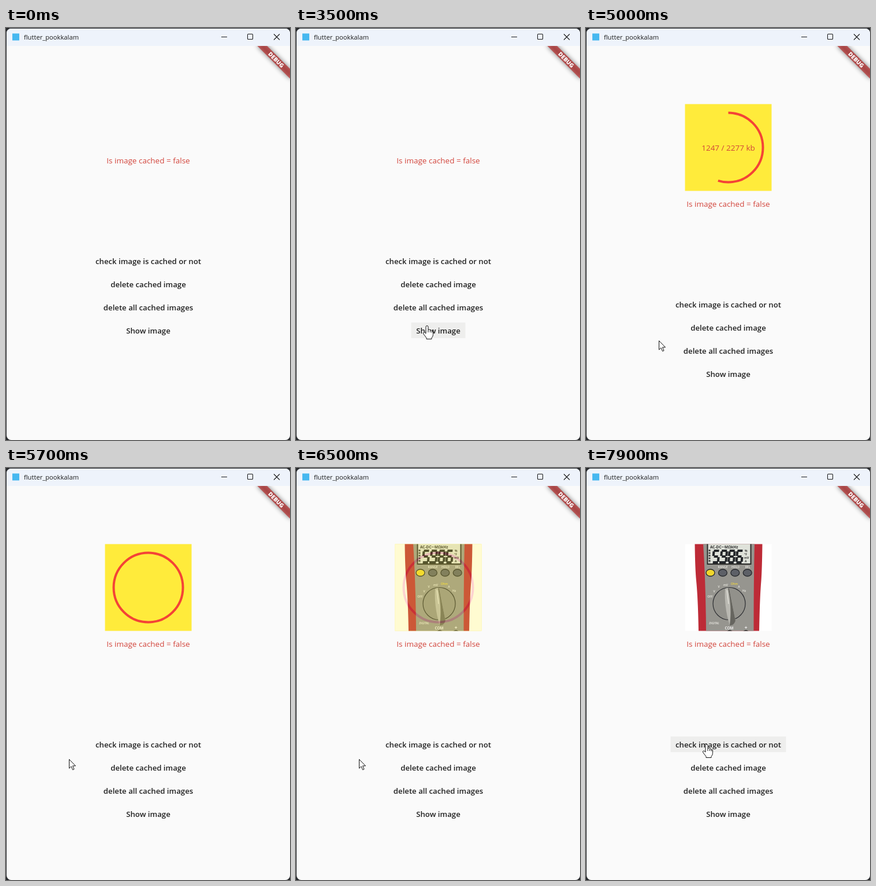
An HTML page for the animation above (8000 ms loop, 492 by 712 pixels).

```html
<!DOCTYPE html>
<html lang="en">
<head>
<meta charset="utf-8">
<title>Image cache demo</title>
<style>
  html, body { margin: 0; width: 100%; height: 100%; overflow: hidden; background: #26282b; }
  svg { display: block; width: 492px; height: 712px; }
  text { font-family: "Open Sans", "Noto Sans", sans-serif; }
  .mid { text-anchor: middle; }
  .title { font-size: 11.2px; fill: #1b1b1b; }
  .red { font-size: 13.5px; fill: #d2443b; }
  .label { font-size: 13.2px; font-weight: 600; fill: #212121; }
  .tiny { font-size: 5px; font-weight: 600; fill: #f0efe8; }
  .unit { font-size: 5px; font-weight: 700; fill: #333; }
</style>
</head>
<body>
<svg viewBox="0 0 492 712">
  <defs>
    <clipPath id="win"><rect x="1" y="1" width="491" height="711" rx="8"/></clipPath>
    <clipPath id="page"><rect x="1" y="31" width="491" height="681"/></clipPath>
    <clipPath id="photoBox"><rect x="171.5" y="131.5" width="150" height="150"/></clipPath>
    <filter id="blur" x="-30%" y="-150%" width="160%" height="400%"><feGaussianBlur stdDeviation="4"/></filter>
  </defs>

  <rect width="492" height="712" fill="#26282b"/>
  <g clip-path="url(#win)">
    <rect width="492" height="712" fill="#fafafa"/>
    <rect width="492" height="31" fill="#eef3fb"/>
    <rect x="11" y="9.5" width="12" height="12" fill="#47b8f0"/>
    <text class="title" x="31" y="20">flutter_pookkalam</text>
    <g fill="none" stroke="#1a1a1a" stroke-width="1.1">
      <path d="M373 15.5h10M464 10.5l10 10m0-10l-10 10"/>
      <rect x="418.5" y="10.5" width="9" height="9" rx="1.3"/>
    </g>

    <g id="loader">
      <rect x="171.5" y="131.5" width="150" height="150" fill="#ffeb3b"/>
      <circle id="ring" cx="246.5" cy="206.5" r="60" fill="none" stroke="#f44336" stroke-width="4"
        pathLength="1" transform="rotate(-90 246.5 206.5)"/>
      <text id="count" class="red mid" x="246.5" y="212"></text>
    </g>

    <g id="photo" clip-path="url(#photoBox)">
      <rect x="171" y="131" width="151" height="151" fill="#fff"/>
      <path d="M188.5 131H305.500Q305 175 303.500 195Q301 225 300 282H195Q194 225 191 195Q189 175 188.500 131Z" fill="#bd2b37"/>
      <path d="M203 131H292Q290.500 190 290.500 282H208Q207.500 200 203 131Z" fill="#96958f"/>
      <rect x="210.5" y="128" width="75" height="38" fill="#dfe2da" stroke="#2a2a28" stroke-width="2"/>
      <text x="215" y="138.5" font-size="6.5" font-weight="700" fill="#333">AC-DC~·MΩkHz</text>
      <g id="digits" fill="none" stroke="#24272a" stroke-width="4"></g>
      <path d="M214 141v23" stroke="#444" stroke-width="3" stroke-dasharray="3 1.5"/>
      <g class="unit">
        <text x="275" y="145">%</text><text x="274" y="151">°F</text>
        <text x="274" y="157">mV</text><text x="275" y="163">A</text>
      </g>
      <g id="keys" stroke="#26282c" stroke-width="1.3"></g>
      <g class="mid">
        <text class="tiny" x="237" y="173">RANGE</text>
        <text class="tiny" x="259" y="173">HOLD</text>
        <text class="tiny" x="280" y="173">REL</text>
        <text class="tiny" x="222" y="215">V</text>
        <text class="tiny" x="230" y="207">V</text>
        <text class="tiny" x="242" y="204">mV</text>
        <text class="tiny" x="257" y="202" style="fill:#f4d83a">Ohm</text>
        <text class="tiny" x="265" y="207">A</text>
        <text class="tiny" x="274" y="214">Hz</text>
        <text class="tiny" x="215" y="224">OFF</text>
        <text class="tiny" x="222" y="270" font-style="italic">DIGITAL</text>
        <text x="248" y="279" font-size="6.5" font-weight="600" fill="#fff">COM</text>
        <text x="277" y="279" font-size="9" font-weight="600" fill="#fff">+</text>
      </g>
      <circle cx="248" cy="234.5" r="28" fill="#92918b" stroke="#2b2c30" stroke-width="1.2"/>
      <path d="M241 209Q244 206 248 208Q254 240 259 264Q256 273 249 272Q239 240 241 209Z" fill="#b9b8b1"/>
      <path d="M248 208Q254 240 259 264Q256 273 249 272Q253 240 246 208Z" fill="#66655f"/>
      <path d="M244 211l3 24" stroke="#f0efe8"/>
      <g fill="#222"><circle cx="249" cy="286" r="6"/><circle cx="277" cy="286" r="6"/></g>
    </g>

    <g id="menu">
      <text class="red mid" x="246.5" y="234">Is image cached = false</text>
    </g>

    <g clip-path="url(#page)">
      <g transform="translate(492 31) rotate(45)">
        <rect x="-40" y="28" width="80" height="12" fill="#000" opacity=".5" filter="url(#blur)"/>
        <rect x="-40" y="28" width="80" height="12" fill="#b71c1c" opacity=".627"/>
        <text class="mid" y="37.5" font-size="9.8" font-weight="800" fill="#fff">DEBUG</text>
      </g>
    </g>

    <g id="cursor" fill="#fff" stroke="#111" stroke-linejoin="round">
      <path id="arrow" d="M.5 .5V16L4 12.700L6.600 18.600L9 17.500L6.500 11.800H11.500Z"/>
      <g id="hand" transform="translate(0 1)">
        <path d="M-2 1.500Q-2-.5 0-.5T2 1.500V6.500Q4.500 5 5.500 7.200Q7.500 6.200 8.300 8.500Q10.500 8 10.500 11V14.500Q10.500 18 8 20.500V22.500H-1V20.500L-6 14Q-7.500 11.600-5.500 10.800Q-4.500 10.300-2 13Z"/>
        <path d="M2 6.500V11M5.500 7.500V11M8.300 8.800V11.500" fill="none"/>
      </g>
    </g>
  </g>
</svg>
<script>
const LOOP = 8000, STEP = 100, CENTER = 246.5;
const CLICK = 3800, LOAD_START = 4290, LOAD_END = 5586, FADE_START = 5730, FADE_TIME = 1000, TOTAL_KB = 2277;
const NS = "http://www.w3.org/2000/svg";
const byId = id => document.getElementById(id);
const clamp = v => Math.max(0, Math.min(1, v));

function add(parent, tag, attrs, text = "") {
  const el = document.createElementNS(NS, tag);
  for (const key in attrs) el.setAttribute(key, attrs[key]);
  el.textContent = text;
  parent.append(el);
  return el;
}

// Menu buttons: label, centre line, half width of the hover area
const buttons = [
  ["check image is cached or not", 402.5, 100],
  ["delete cached image", 442.5, 73.5],
  ["delete all cached images", 482.5, 86],
  ["Show image", 522.5, 47],
].map(([label, y, half]) => {
  const area = add(byId("menu"), "rect", { x: CENTER - half, y: y - 13.5, width: 2 * half, height: 27, fill: "#eeeeed" });
  add(byId("menu"), "text", { class: "label mid", x: CENTER, y: y + 5.5 }, label);
  return { y, half, area };
});

// Seven-segment display
const SEGMENTS = { a: "M0 0h9", b: "M9 1v8", c: "M9 11v8", d: "M0 20h9", e: "M0 11v8", f: "M0 1v8", g: "M1 10h7" };
["afgcd", "abcdfg", "abcdefg", "acdefg"].forEach((on, i) => {
  add(byId("digits"), "path", {
    d: [...on].map(s => SEGMENTS[s]).join(""),
    transform: `translate(${221.5 + i * 13.6} 143) skewX(-5)`,
  });
});
add(byId("digits"), "path", { d: "M231 163h3" });

for (let i = 0; i < 4; i++) {
  add(byId("keys"), "ellipse", { cx: 215.5 + i * 21.4, cy: 181, rx: 7.5, ry: 6, fill: i ? "#5d6067" : "#f0d62c" });
}

// Pointer path: time, x, y
const track = [
  [800, -14, 474], [1200, 48, 430], [1600, 168, 402], [1800, 179, 397], [2300, 182, 393],
  [2500, 205, 376], [2600, 210, 432], [3000, 222, 476], [3400, 227, 501], [3500, 227, 514],
  [4300, 227, 514], [4600, 190, 551], [4800, 152, 557], [5000, 126, 540], [5300, 112, 514],
  [5500, 109, 503], [7100, 109, 503], [7400, 150, 518], [7600, 180, 509], [7800, 205, 483], [7900, 209, 477],
];

function pointerAt(t) {
  const i = track.findIndex(p => p[0] > t);
  if (i === 0) return track[0].slice(1);
  if (i < 0) return track.at(-1).slice(1);
  const [t0, x0, y0] = track[i - 1], [t1, x1, y1] = track[i];
  const k = (t - t0) / (t1 - t0);
  return [x0 + (x1 - x0) * k, y0 + (y1 - y0) * k];
}

function draw(t) {
  const shown = t >= CLICK;
  const shift = shown ? 75 : 0;
  byId("menu").setAttribute("transform", `translate(0 ${shift})`);

  const [x, y] = pointerAt(t);
  let over = false;
  buttons.forEach((b, i) => {
    const hit = Math.abs(x - CENTER) <= b.half && Math.abs(y - b.y - shift) <= 13.5;
    const pressed = i === 3 && shown && t < CLICK + 200;
    b.area.setAttribute("opacity", hit || pressed ? 1 : 0);
    over = over || hit;
  });
  byId("cursor").setAttribute("transform", `translate(${x} ${y})`);
  byId("cursor").setAttribute("visibility", t >= 800 ? "visible" : "hidden");
  byId("hand").setAttribute("display", over ? "inline" : "none");
  byId("arrow").setAttribute("display", over ? "none" : "inline");

  const loaded = clamp((t - LOAD_START) / (LOAD_END - LOAD_START));
  const fade = clamp((t - FADE_START) / FADE_TIME);
  byId("loader").setAttribute("display", shown && fade < 1 ? "inline" : "none");
  byId("ring").setAttribute("stroke-dasharray", `${loaded} 2`);
  byId("ring").setAttribute("opacity", loaded ? 1 : 0);
  byId("count").textContent = loaded > 0 && loaded < 1 ? `${Math.floor(loaded * TOTAL_KB)} / ${TOTAL_KB} kb` : "";
  byId("photo").setAttribute("opacity", fade);
}

const start = performance.now();
function tick() {
  const t = (performance.now() - start) % LOOP;
  draw(Math.floor(t / STEP) * STEP);
  requestAnimationFrame(tick);
}
draw(0);
requestAnimationFrame(tick);
</script>
</body>
</html>
```
